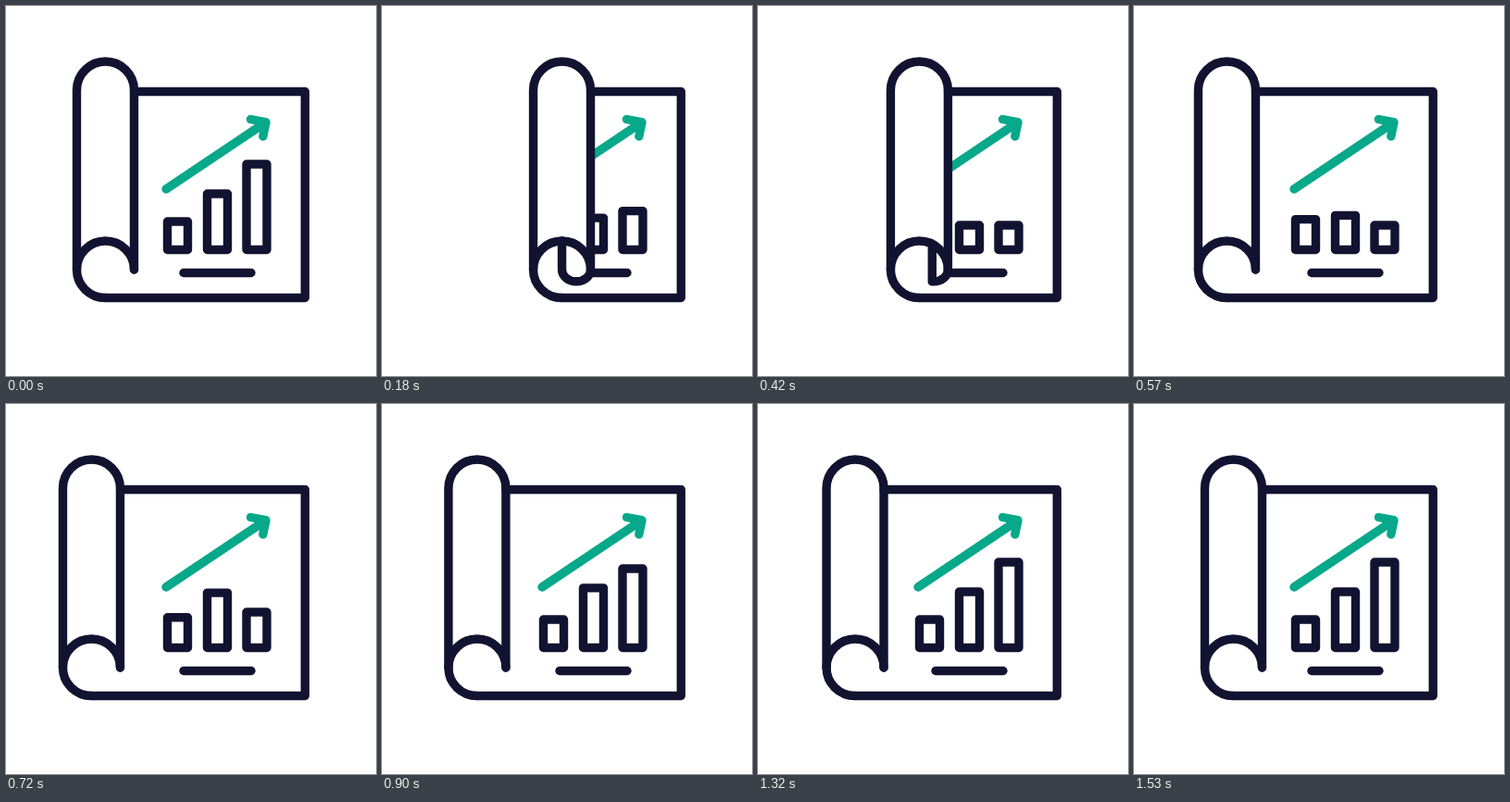
Write an HTML page with a canvas that moves like this. It is 400 px wide and 400 px high and loops after 1.56 s.

```html
<!DOCTYPE html>
<html lang="en">
<head>
<meta charset="utf-8">
<title>Scroll chart</title>
<style>
html, body { margin: 0; width: 100%; height: 100%; overflow: hidden; background: #fff; }
canvas { display: block; width: 400px; height: 400px; }
</style>
</head>
<body>
<canvas id="stage"></canvas>
<script>
const LOOP = 1560, STEP = 30;
const NAVY = '#121331', GREEN = '#08a88a';
const REST = 76.5, RADIUS = 31, CURL_Y = 285, BASE = 263.5, LOW = 237;

const canvas = document.getElementById('stage');
const ratio = window.devicePixelRatio || 1;
canvas.width = canvas.height = 400 * ratio;
const ctx = canvas.getContext('2d');
ctx.scale(ratio, ratio);

// Keys are [time, value] pairs, eased in and out between neighbours.
function track(keys, t) {
  if (t <= keys[0][0]) return keys[0][1];
  for (let i = 1; i < keys.length; i++) {
    const [t0, a] = keys[i - 1], [t1, b] = keys[i];
    if (t < t1) {
      const p = (t - t0) / (t1 - t0);
      return a + (b - a) * p * p * (3 - 2 * p);
    }
  }
  return keys[keys.length - 1][1];
}

const rollKeys = [[0, REST], [270, 194], [630, 59.5], [1087, 79], [1320, 74], [1500, REST]];

const bars = [
  { x: 174.5, top: 233, peak: 230 },
  { x: 217.5, top: 203, peak: 197.5 },
  { x: 260, top: 171, peak: 166 }
].map((bar, i) => {
  const start = 262 + i * 180;
  const keys = [[0, bar.top], [262, LOW], [start, LOW], [start + 376, bar.peak], [start + 626, bar.top]];
  return { x: bar.x, keys };
});

function stroke(color, build) {
  ctx.strokeStyle = color;
  ctx.beginPath();
  build();
  ctx.stroke();
}

function polyline(color, ...points) {
  stroke(color, () => points.forEach(([x, y]) => ctx.lineTo(x, y)));
}

function drawChart(t, left) {
  ctx.save();
  ctx.beginPath();
  ctx.rect(left, 0, 400 - left, 400);
  ctx.clip();
  for (const { x, keys } of bars) {
    const top = track(keys, t);
    stroke(NAVY, () => ctx.rect(x, top, 22, BASE - top));
  }
  polyline(NAVY, [192, 288.5], [265, 288.5]);
  polyline(GREEN, [173, 198], [280.5, 126]);
  polyline(GREEN, [264.5, 122.5], [281, 125.7], [277.8, 141]);
  ctx.restore();
}

function drawCurl(x) {
  const shift = Math.max(0, x - REST) / 86;
  const sweep = Math.PI * (shift < 1 ? shift ** 2.5 : 1 + (shift - 1) * 0.85);
  if (sweep < 0.01) return;
  const offset = 15.5 + 15.5 * Math.cos(sweep);
  const arcTop = CURL_Y - Math.sqrt(Math.max(0, RADIUS ** 2 - offset ** 2));
  stroke(NAVY, () => {
    ctx.ellipse(x + RADIUS + 15.5, CURL_Y, 15.5, 12.8, 0, 0, sweep);
    ctx.lineTo(x + RADIUS + offset, arcTop);
  });
}

function drawRoll(x) {
  const mid = x + RADIUS, right = mid + RADIUS;
  polyline(NAVY, [right, 92.5], [323.3, 92.5], [323.3, 315.5], [mid, 315.5]);
  stroke(NAVY, () => {
    ctx.moveTo(right, CURL_Y);
    ctx.lineTo(right, 91);
    ctx.arc(mid, 91, RADIUS, 0, Math.PI, true);
    ctx.lineTo(x, CURL_Y);
    ctx.ellipse(mid, CURL_Y, RADIUS, 30.5, 0, Math.PI, Math.PI / 2, true);
  });
  stroke(NAVY, () => ctx.arc(mid, CURL_Y, RADIUS, Math.PI, 0));
  drawCurl(x);
}

function draw(now) {
  const t = Math.floor((now % LOOP) / STEP) * STEP;
  const x = track(rollKeys, t);
  ctx.fillStyle = '#fff';
  ctx.fillRect(0, 0, 400, 400);
  ctx.lineWidth = 9.4;
  ctx.lineCap = ctx.lineJoin = 'round';
  drawChart(t, x + 2 * RADIUS);
  drawRoll(x);
}

const begin = performance.now();
function tick() {
  draw(performance.now() - begin);
  requestAnimationFrame(tick);
}
tick();
</script>
</body>
</html>
```
